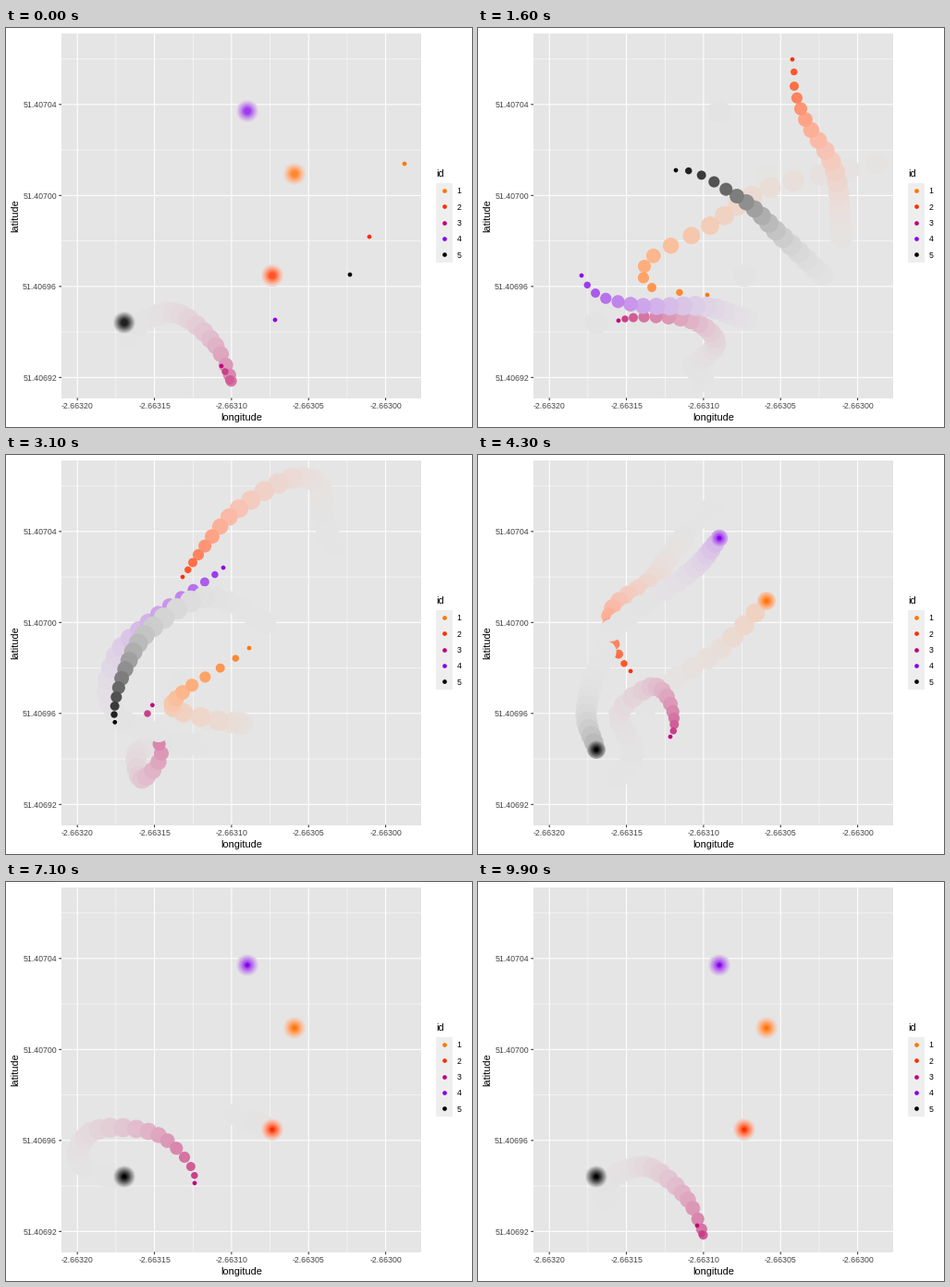
Animation, 504 px wide and 432 px high, one loop 10000 ms. Source, as a matplotlib script:

```python
import numpy as np
import matplotlib.pyplot as plt
from matplotlib.animation import FuncAnimation
from matplotlib.colors import to_rgb
from matplotlib.patches import Rectangle

plt.rcParams["font.family"] = "Liberation Sans"

W, H, DPI = 504, 432, 72
FRAMES, WAKE = 100, 20
HEAD_R, TAIL_R = 2.35, 12
LEFT, TOP, RIGHT, BOTTOM = 60, 5.5, 449, 400.5
COLORS = ["#FF7700", "#FF2E00", "#C1007C", "#8B00EE", "#000000"]
FADE, PANEL, KEY = "#E4E4E4", "#E5E5E5", "#EEEEEE"

# Turning points of each walk: (frame, x, y)
ORANGE = [(0, 431, 147), (4, 316, 173), (8, 251, 214), (12, 180, 258),
          (14, 188, 281), (16, 248, 289), (19, 243, 290), (23, 181, 274),
          (26, 191, 257), (31, 263, 209), (35, 312, 158)]
RED = [(0, 393, 226), (7, 382, 144), (11, 354, 99), (14, 342, 63),
       (16, 340, 34), (18, 321, 24), (23, 252, 58), (28, 208, 108),
       (31, 191, 132), (37, 142, 174), (39, 144, 194), (43, 165, 234),
       (49, 230, 246), (56, 288, 268)]
MAGENTA = [(0, 233, 366), (4, 257, 342), (8, 239, 320), (15, 159, 315),
           (18, 142, 323), (22, 147, 351), (26, 168, 323), (30, 153, 280),
           (34, 187, 251), (40, 212, 285), (43, 208, 305), (49, 137, 325),
           (55, 78, 300), (59, 92, 271), (65, 165, 274), (71, 204, 326),
           (76, 158, 357), (81, 135, 331), (87, 181, 308), (93, 227, 344),
           (98, 242, 381), (99, 237, 372)]
PURPLE = [(0, 291, 316), (5, 247, 302), (11, 165, 299), (14, 127, 287),
          (16, 112, 268), (20, 119, 218), (24, 154, 181), (31, 235, 122),
          (36, 261, 90)]
BLACK = [(0, 372, 267), (5, 330, 227), (11, 280, 182), (16, 214, 154),
         (20, 159, 186), (25, 129, 232), (30, 117, 281), (35, 128, 319)]

# sRGB to XYZ, for blending in Lab
TO_XYZ = np.array([[0.4124, 0.3576, 0.1805],
                   [0.2126, 0.7152, 0.0722],
                   [0.0193, 0.1192, 0.9505]])
WHITE = TO_XYZ.sum(axis=1)


def to_cone(color):
    """Lab's compressed XYZ; Lab is linear in it, so blends agree."""
    rgb = np.array(to_rgb(color))
    lin = np.where(rgb > 0.04045, ((rgb + 0.055) / 1.055) ** 2.4, rgb / 12.92)
    v = TO_XYZ @ lin / WHITE
    return np.where(v > 0.008856, np.cbrt(v), 7.787 * v + 16 / 116)


def from_cone(f):
    v = np.where(f > 0.2069, f ** 3, (f - 16 / 116) / 7.787) * WHITE
    lin = np.clip(v @ np.linalg.inv(TO_XYZ).T, 0, 1)
    rgb = np.where(lin > 0.0031308, 1.055 * lin ** (1 / 2.4) - 0.055, 12.92 * lin)
    return np.clip(rgb, 0, 1)


def trace(points):
    """Hermite curve through the points, one position per frame."""
    p = np.array(points, float)
    t, xy = p[:, 0], p[:, 1:]
    slope = np.gradient(xy, t, axis=0)
    now = np.clip(np.arange(FRAMES), t[0], t[-1])
    i = np.clip(np.searchsorted(t, now, side="right") - 1, 0, len(t) - 2)
    h = (t[i + 1] - t[i])[:, None]
    u = (now - t[i])[:, None] / h
    v = 1 - u
    return (v * v * (1 + 2 * u) * xy[i] + u * u * (1 + 2 * v) * xy[i + 1]
            + u * v * h * (v * slope[i] - u * slope[i + 1]))


tracks = [trace(p) for p in (ORANGE, RED, MAGENTA, PURPLE, BLACK)]

# Oldest first, so newer points lie on top
ages = np.arange(WAKE, -1, -1)
ease = 1 - (1 - ages / WAKE) ** 3
radii = HEAD_R + (TAIL_R - HEAD_R) * ease


def wake_colors(color):
    a, b = to_cone(color), to_cone(FADE)
    return from_cone(a + (b - a) * ease[:, None])


fig = plt.figure(figsize=(W / DPI, H / DPI), dpi=DPI, facecolor="white")
ax = fig.add_axes([0, 0, 1, 1])
ax.set(xlim=(0, W), ylim=(H, 0))
ax.axis("off")


def box(x0, y0, x1, y1, color):
    ax.add_patch(Rectangle((x0, y0), x1 - x0, y1 - y0, fc=color, lw=0, zorder=0))


def line(xs, ys, color="white", width=1.07):
    ax.plot(xs, ys, color=color, lw=width, solid_capstyle="butt",
            snap=False, zorder=1)


def text(x, y, s, size=8.8, color="#444444", ha="center", **kw):
    ax.text(x, y, s, fontsize=size, color=color, ha=ha, va="baseline", **kw)


box(LEFT, TOP, RIGHT, BOTTOM, PANEL)
x_step, y_step = 83.35, 98.52
xticks = 77.2 + x_step * np.arange(5)
yticks = 82.8 + y_step * np.arange(4)
for x in xticks[:-1] + x_step / 2:
    line([x, x], [TOP, BOTTOM], width=0.53)
for y in yticks - y_step / 2:
    line([LEFT, RIGHT], [y, y], width=0.53)
for k, x in enumerate(xticks):
    line([x, x], [TOP, BOTTOM])
    line([x, x], [BOTTOM, BOTTOM + 2.75], "#333333")
    text(x, 411.9, f"{-2.6632 + 0.00005 * k:.5f}")
for k, y in enumerate(yticks):
    line([LEFT, RIGHT], [y, y])
    line([LEFT - 2.75, LEFT], [y, y], "#333333")
    text(55, y + 3.2, f"{51.40704 - 0.00004 * k:.5f}", ha="right")
text((LEFT + RIGHT) / 2, 425, "longitude", 11, "black")
text(13, (TOP + BOTTOM) / 2, "latitude", 11, "black",
     rotation=90, rotation_mode="anchor")

text(465, 161, "id", 11, "black", "left")
box(465, 167.5, 482.5, 254, KEY)
for k, color in enumerate(COLORS):
    y = 176.2 + 17.28 * k
    ax.scatter([474], [y], s=(2 * HEAD_R) ** 2, color=color, lw=0, zorder=2)
    text(487.6, y + 3.2, str(k + 1), color="black", ha="left")

blank = np.zeros(len(COLORS) * len(ages))
dots = ax.scatter(blank, blank, s=np.tile((2 * radii) ** 2, len(COLORS)),
                  c=np.vstack([wake_colors(c) for c in COLORS]),
                  lw=0, zorder=3)


def update(frame):
    when = (frame - ages) % FRAMES
    dots.set_offsets(np.vstack([track[when] for track in tracks]))
    return dots,


anim = FuncAnimation(fig, update, frames=FRAMES, interval=1000 * 10 // FRAMES,
                     repeat=True, repeat_delay=0)
plt.show()
```
